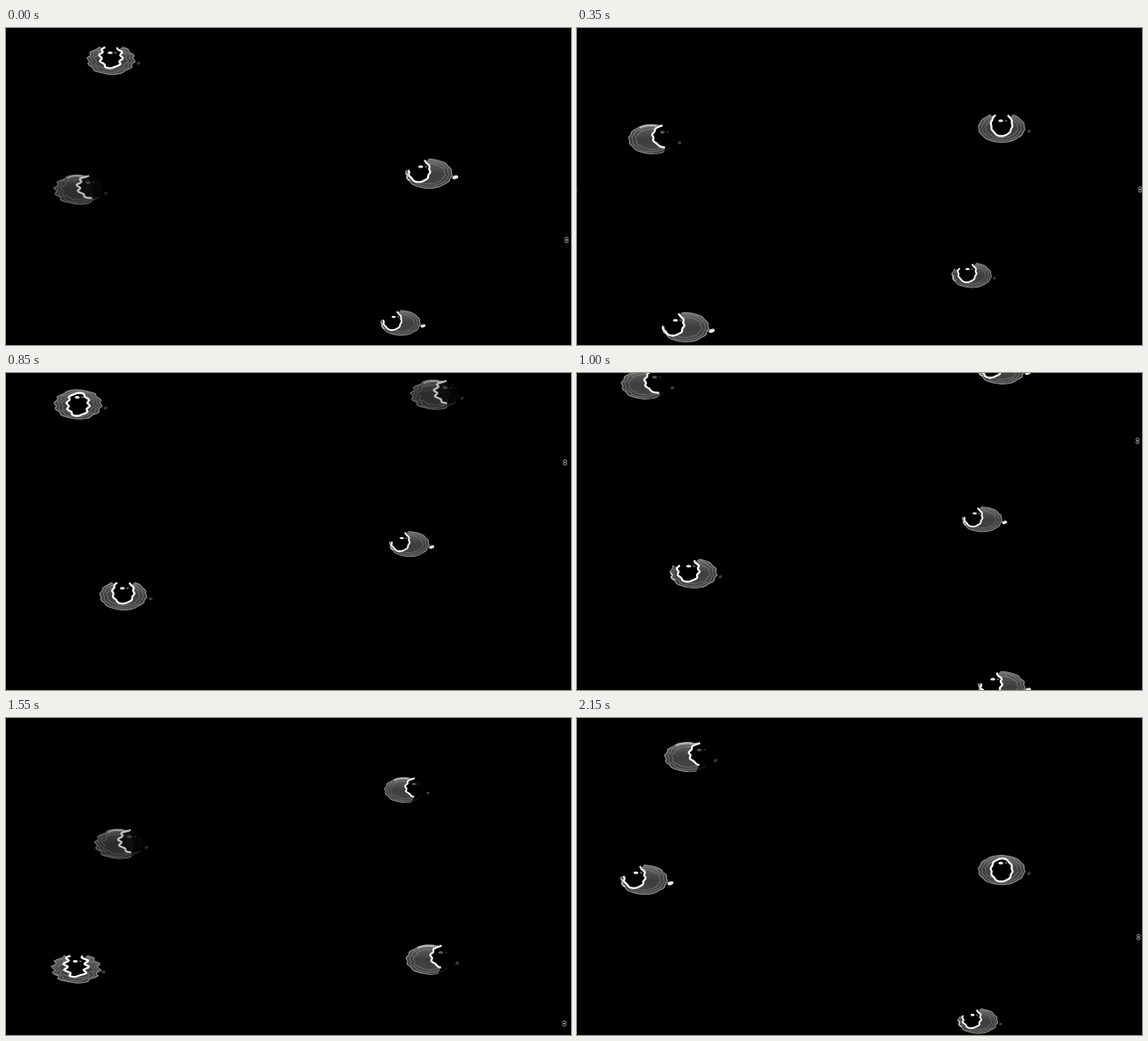
Write an HTML page with a canvas that moves like this. It is 640x359 px and loops after 2.2 s.

```html
<!DOCTYPE html>
<html lang="en">
<head>
<meta charset="utf-8">
<title>Drifting slices</title>
<style>
html, body { margin: 0; width: 100%; height: 100%; overflow: hidden; background: #000 }
canvas { display: block }
</style>
</head>
<body>
<canvas id="stage" width="640" height="359"></canvas>
<script>
const g = document.getElementById('stage').getContext('2d');
const LOOP = 2200, STEP = 50, H = 359, RAD = Math.PI / 180;
const times = [0, 350, 650, 1000, 1300, 1800, 2150];

// Each pose: centre x, vertical offset, cavity shift (-1 left .. 1 right), ripple (negative = closed ring)
const blobs = [
  { y: 37, size: 1, poses: [[119, -1, 0, 1.6], [123, 0, -.7, .7], [134, -5, 0, .8], [132, -6, -.3, 1],
    [125, -6, -.6, .6], [131, 5, .85, 2], [126, -1, .9, 1]] },
  { y: 183, size: 1, poses: [[82, 0, .8, 2], [85, 0, .85, .7], [88, -11, 0, -1.5], [77, -7, .8, 1],
    [80, -8, -.5, 1.2], [79, -3, 0, 2.6], [76, -8, -.55, .8]] },
  { y: 165, size: 1, poses: [[479, 0, -.55, .6], [481, 5, 0, .4], [492, 4, .85, 2], [481, -6, -.6, 1],
    [475, 2, .9, .5], [485, 3, .9, 1], [481, -1, 0, -.6]] },
  { y: 334, size: .85, poses: [[447, 0, -.55, .5], [447, 3, -.3, .6], [454, 3, .8, 2], [459, -5, -.6, .6],
    [453, -2, .5, .7], [450, 3, .9, 1], [454, 1, -.4, 1]] }
];
const speckX = [635, 638, 631, 635, 635, 630, 636];

const mix = (a, b, k) => a + (b - a) * k;
const mod = (a, n) => (a % n + n) % n;
const noise = (a, b) => mod(Math.sin(a * 12.99 + b * 78.23) * 43758.5, 1);
const grey = (v, a = 1) => `rgba(${v},${v},${v},${a})`;

function segment(t) {
  let i = times.length - 1;
  while (times[i] > t) i--;
  const end = times[i + 1] ?? LOOP;
  return { i, j: (i + 1) % times.length, k: (t - times[i]) / (end - times[i]) };
}

// Elliptic arc with its rows shifted sideways
function arc(x, y, rx, ry, from, to, ripple) {
  g.beginPath();
  for (let n = 0; n <= 48; n++) {
    const a = mix(from, to, n / 48) * RAD, dy = ry * Math.sin(a);
    g.lineTo(x + rx * Math.cos(a) + ripple * Math.sin(dy * .9), y + dy);
  }
}

function stroke(shade, width) {
  g.strokeStyle = shade;
  g.lineWidth = width;
  g.stroke();
}

function spot(x, y, rx, ry, shade, tilt = 0) {
  g.beginPath();
  g.ellipse(x, y, rx, ry, tilt, 0, 7);
  g.fillStyle = shade;
  g.fill();
}

function drawBlob(x, y, s, shift, ripple) {
  const closed = ripple < 0, right = Math.max(shift, 0), left = Math.max(-shift, 0);
  const wave = Math.abs(ripple);
  g.save();
  g.translate(x, y);
  g.scale(s, s);
  g.globalAlpha = right > .5 && wave >= 2 ? .7 : 1;

  arc(0, 0, 26, 16.5, 0, 360, wave);
  const fill = g.createLinearGradient(0, -16, 0, 16);
  fill.addColorStop(0, grey(100));
  fill.addColorStop(.5, grey(62));
  fill.addColorStop(1, grey(70));
  g.fillStyle = fill;
  g.fill();
  stroke(grey(140), 1.2);
  for (const k of [.86, .7]) {
    arc(0, 0, 26 * k, 16.5 * k, 0, 360, wave);
    stroke(grey(190, .3), 1.1);
  }

  const cx = shift * 20, cy = closed ? 0 : -3.5;
  const rx = 12 + 5 * right, ry = 13;
  const from = closed ? 0 : -55 + 178 * right - 15 * left;
  const to = closed ? 360 : 235 + 17 * right - 95 * left;
  arc(cx, cy, rx, ry, 0, 360, wave);
  g.fillStyle = '#000';
  g.fill();
  if (!closed) {
    arc(cx, cy, 48, 30, to, from + 360, 0);
    g.lineTo(cx, cy);
    g.fill();
  }
  if (right > .3) {
    arc(0, 0, 25, 16, 35, 90, 0);
    stroke(grey(55), 1);
  }
  arc(cx, cy, rx, ry, from, to, wave);
  stroke('#fff', 2.2);
  if (right > .4) {
    arc(-1, -1, 24, 14.5, 235, 285, wave);
    stroke(grey(190), 1.6);
  }
  if (left > .2) {
    arc(0, 0, 25, 15.5, 150, 185, wave);
    stroke(grey(210), 1.3);
  }

  // Bright speck inside the cavity, stray speck outside
  spot(shift * 15 - 1, -8, 2.8, 1.5, grey(right > .4 ? 90 : 240));
  spot(shift * 15 + 5, -8, 1.4, 1, grey(right > .4 ? 45 : 110));
  const bright = left > .45;
  spot(31 - 2 * left, 4, bright ? 3.5 : 2.2, bright ? 2.1 : 1.7, grey(bright ? 230 : 58), -.3);
  g.restore();
}

function drawSpeck(x, y) {
  for (const dy of [-1.6, 1.6]) {
    g.beginPath();
    g.ellipse(x, y + dy, 2, 1.4, 0, 0, 7);
    stroke(grey(150), 1);
  }
}

function draw(t) {
  const { i, j, k } = segment(t);
  const rise = t * H / LOOP;
  g.fillStyle = '#000';
  g.fillRect(0, 0, 640, H);
  blobs.forEach(({ y, size, poses }, n) => {
    const a = poses[i], b = poses[j];
    const look = k && noise(t / STEP, n) < k ? b : a;
    const top = mod(y - rise + mix(a[1], b[1], k), H);
    for (const v of [top, top - H])
      drawBlob(mix(a[0], b[0], k), v, size, look[2], look[3]);
  });
  const x = mix(speckX[i], speckX[j], k), y = mod(240 - rise, H);
  for (const v of [y, y - H]) {
    drawSpeck(x, v);
    drawSpeck(x - 640, v);
  }
}

function tick() {
  const t = performance.now() % LOOP;
  draw(Math.floor(t / STEP) * STEP);
  requestAnimationFrame(tick);
}
tick();
</script>
</body>
</html>
```
